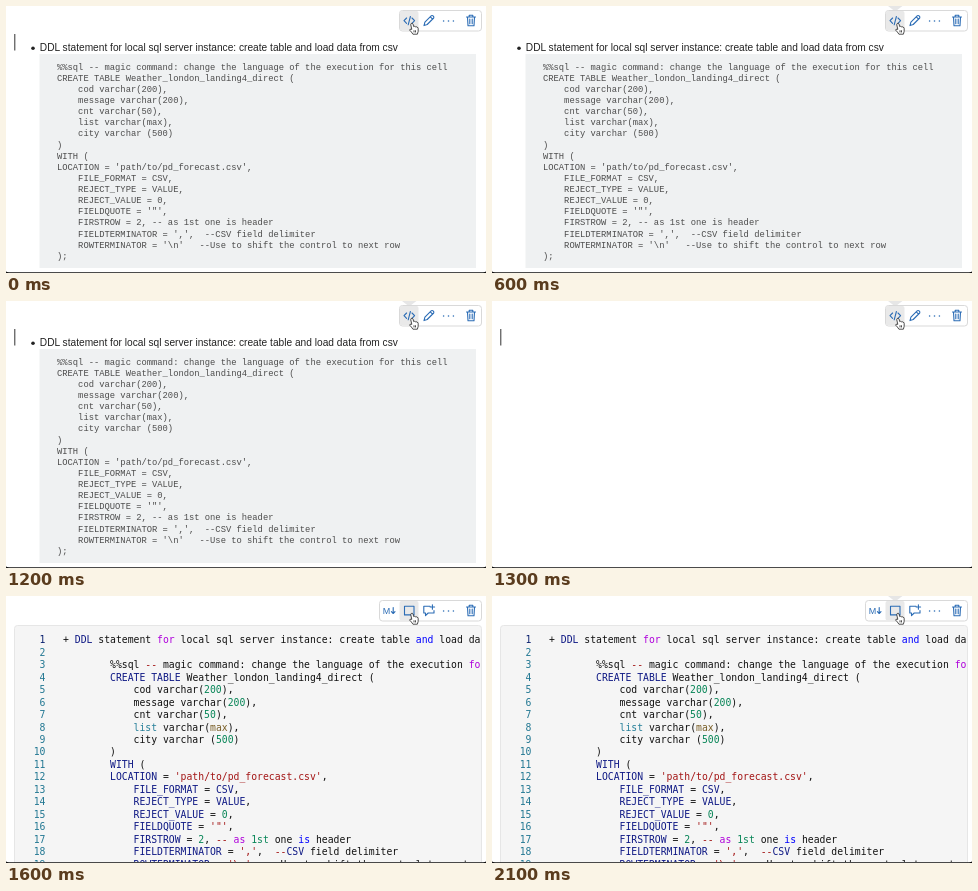
These frames come from a looping animation (480 by 267 pixels, 2.2 s). An HTML page:

```html
<!DOCTYPE html>
<html lang="en">
<head>
<meta charset="utf-8">
<title>Notebook cell: preview and edit</title>
<style>
html, body { margin: 0; width: 100%; height: 100%; overflow: hidden; background: #fff; }
svg { display: block; width: 100%; height: 100%; }
text { white-space: pre; }
.title { font: 10.19px "Liberation Sans", Arial, sans-serif; fill: #222; }
.plain { font: 8.8px "Liberation Mono", "Courier New", monospace; fill: #4c4c4c; }
.code { font: 9.78px "DejaVu Sans Mono", Menlo, monospace; fill: #111; }
.num { fill: #237893; text-anchor: end; }
.num.on { fill: #0b216f; }
.number { fill: #098658; }
.string, .dash { fill: #a31515; }
.caps { fill: #101a85; }
.flow { fill: #af00db; }
.word { fill: #0000ff; }
.type { fill: #267f99; }
.call { fill: #795e26; }
.early .late { fill: #111; }
.icon { fill: none; stroke: #2b6cb5; stroke-width: 1.1; stroke-linejoin: round; stroke-linecap: round; }
.md { font: 9px "Liberation Sans", Arial, sans-serif; fill: #2b6cb5; }
</style>
</head>
<body>
<svg viewBox="0 0 480 267" preserveAspectRatio="none">
  <defs>
    <clipPath id="pane"><rect x="8" y="29" width="467" height="237"/></clipPath>
    <g id="common">
      <g fill="#2b6cb5"><circle cx="437.6" cy="15" r=".8"/><circle cx="442.5" cy="15" r=".8"/><circle cx="447.4" cy="15" r=".8"/></g>
      <path class="icon" d="M460.5 11H469.5M463.2 11V9.3H466.8V11M461.5 11L462 19.8H468L468.5 11M463.8 13V17.8M466.2 13V17.8"/>
    </g>
  </defs>
  <rect width="480" height="267" fill="#fff"/>
  <g id="preview">
    <circle cx="27" cy="42.2" r="1.8" fill="#222"/>
    <text class="title" x="33.8" y="45.4">DDL statement for local sql server instance: create table and load data from csv</text>
    <rect x="33.5" y="48" width="436.5" height="214" fill="#eff1f2"/>
  </g>
  <rect id="caret" x="8.3" y="28" width="1" height="16.5" fill="#333"/>
  <g id="editor">
    <rect x="8.5" y="29.5" width="467" height="250" rx="3" fill="#f5f5f5" stroke="#e6e6e6"/>
    <g id="lines" clip-path="url(#pane)"></g>
  </g>
  <path id="tip" d="M396 0H410.5L403.2 5.5Z" fill="#e6e6e6"/>
  <g id="viewBar">
    <rect x="393.5" y="4.5" width="82" height="20.5" rx="3" fill="#fff" stroke="#d9d9d9"/>
    <rect x="394" y="5" width="18.5" height="19.5" rx="2" fill="#e9e9e9"/>
    <path class="icon" d="M400.6 12L398 14.7L400.6 17.4M406 12L408.6 14.7L406 17.4M404.4 10.5L402.2 18.8"/>
    <path class="icon" d="M418 19.6L418.9 16.2L425.4 9.7Q426.4 9.2 427.4 10.2Q428.2 11.2 427.7 12L421.2 18.5ZM424.3 10.8L426.6 13.1"/>
    <use href="#common"/>
  </g>
  <g id="editBar">
    <rect x="373.5" y="4.5" width="102" height="20.5" rx="3" fill="#fff" stroke="#d9d9d9"/>
    <rect x="393.5" y="5" width="19" height="19.5" rx="2" fill="#e9e9e9"/>
    <text class="md" x="376.8" y="17.7">M</text>
    <path class="icon" d="M387.2 11.5V17.3M385.4 15.6L387.2 17.5L389 15.6"/>
    <rect class="icon" x="398.5" y="10.3" width="9.5" height="8.6"/>
    <path id="note" class="icon" d="M424 10.3H417.8V17H419.5V19.7L422.2 17H428V14.5M426.4 8.8V13.2M424.2 11H428.6"/>
    <use href="#common"/>
  </g>
  <path d="M405.2 17.5Q406.4 16.6 407 18L407.7 20.6Q408.7 19.9 409.4 20.8Q410.4 20.3 411 21.3Q412.2 21.1 412.2 22.6Q412.5 25.4 411.4 28.2H406.9Q405.5 25.8 403.6 24.1Q403.4 22.8 405.8 23.3L404.8 19Q404.6 18 405.2 17.5ZM408 24.3V26.4M409.5 24.3V26.4" fill="#fff" stroke="#222" stroke-width=".8" stroke-linejoin="round"/>
  <path d="M0 265.5Q1 266.2 3 266.2H477Q479 266.2 480 265.5V267H0Z" fill="#111"/>
</svg>
<script>
const LOOP = 2200;
const SQL = String.raw`%%sql -- magic command: change the language of the execution for this cell
CREATE TABLE Weather_london_landing4_direct (
    cod varchar(200),
    message varchar(200),
    cnt varchar(50),
    list varchar(max),
    city varchar (500)
)
WITH (
LOCATION = 'path/to/pd_forecast.csv',
    FILE_FORMAT = CSV,
    REJECT_TYPE = VALUE,
    REJECT_VALUE = 0,
    FIELDQUOTE = '"',
    FIRSTROW = 2, -- as 1st one is header
    FIELDTERMINATOR = ',',  --CSV field delimiter
    ROWTERMINATOR = '\n'   --Use to shift the control to next row
);`.split("\n");
const SOURCE = ["+ DDL statement for local sql server instance: create table and load data from csv", "",
  ...SQL.map(line => " ".repeat(8) + line)];
const TOKEN = /('[^']*'|--|\b\d+(?:st)?\b|\b[A-Z][A-Z_]+\b|\b(?:for|and|as|is|list|max)\b)/;
const WORDS = { for: "flow", as: "flow", and: "word", is: "word", list: "type", max: "call" };

const $ = id => document.getElementById(id);

function add(parent, tag, attrs, text = "") {
  const el = document.createElementNS("http://www.w3.org/2000/svg", tag);
  for (const key in attrs) el.setAttribute(key, attrs[key]);
  el.textContent = text;
  parent.append(el);
  return el;
}

function kind(token) {
  if (WORDS[token]) return WORDS[token];
  if (token[0] === "'") return "string";
  if (token === "--") return "dash";
  return /^\d/.test(token) ? "number" : "caps";
}

SQL.forEach((line, i) =>
  add($("preview"), "text", { class: "plain", x: 51, y: 63.7 + i * 11.12 }, line));

SOURCE.forEach((line, i) => {
  const y = 47.4 + i * 12.45;
  add($("lines"), "text", { class: i ? "code num" : "code num on", x: 39.5, y }, i + 1);
  const row = add($("lines"), "text", { class: "code", x: 57, y });
  line.split(TOKEN).forEach((part, n) => {
    if (n % 2 === 0) return row.append(part);
    const type = kind(part);
    const late = i > 9 || ["caps", "string", "type", "call"].includes(type);
    add(row, "tspan", { class: type + (late ? " late" : "") }, part);
  });
});

const ramp = (t, from, to) => Math.max(0, Math.min(1, (t - from) / (to - from)));
const show = (id, on) => $(id).style.display = on ? "" : "none";

function draw(t) {
  const editing = t >= 1500, ready = t >= 1600;
  show("preview", t < 1300);
  show("viewBar", !editing);
  show("editor", editing);
  show("editBar", editing);
  show("caret", !editing && (t < 500 || t >= 1000));
  $("tip").style.opacity = editing ? ramp(t, 1800, 2000) : ramp(t, 300, 600);
  $("editor").setAttribute("class", ready ? "" : "early");
  $("note").style.stroke = ready ? "" : "#c9ced4";
}

const start = performance.now();
function tick() {
  draw((performance.now() - start) % LOOP);
  requestAnimationFrame(tick);
}
tick();
</script>
</body>
</html>
```
